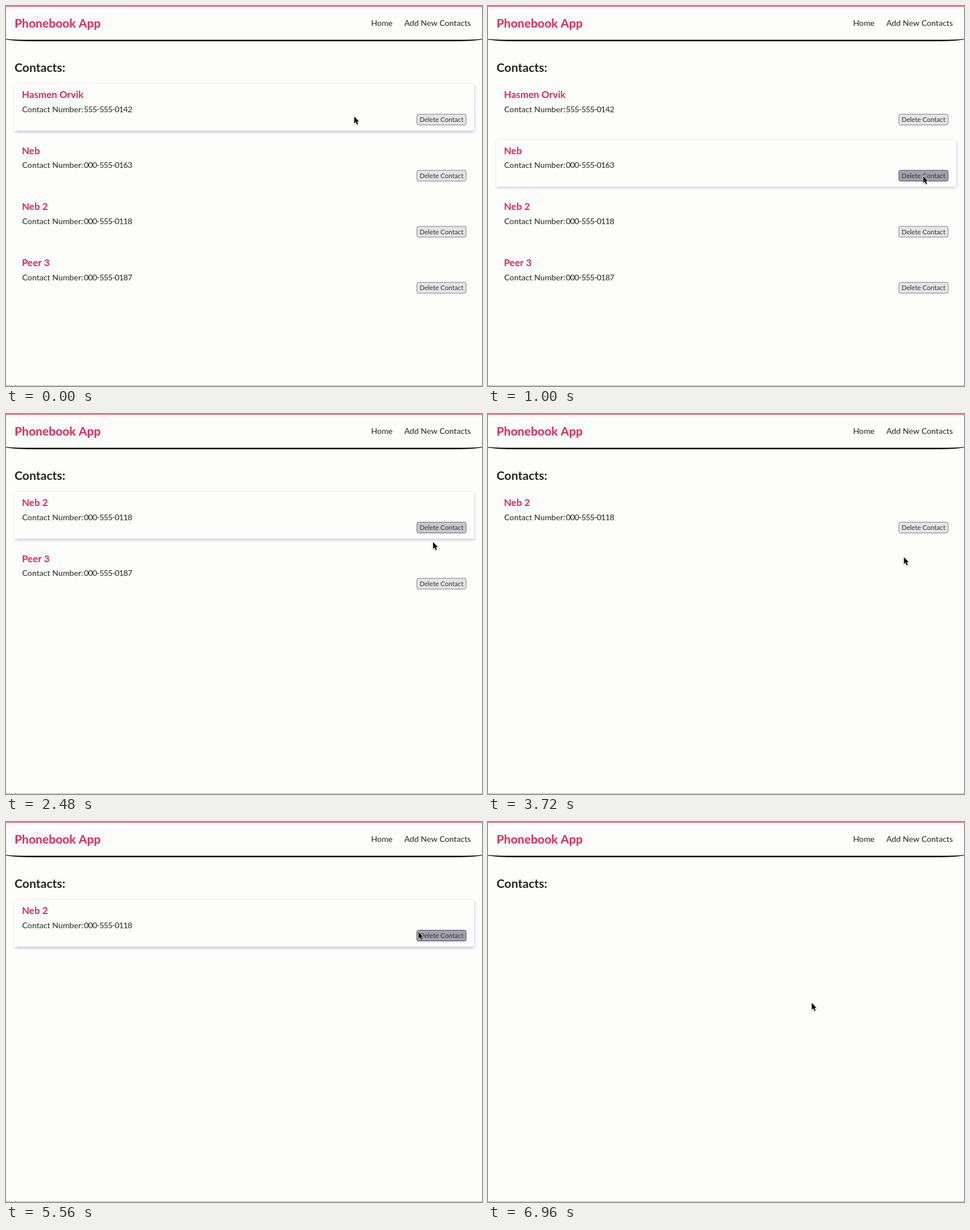
Recreate the animation shown at these times as an HTML page with a canvas. Size 837 by 669 pixels, loop 7000 ms.

```html
<!DOCTYPE html>
<html lang="en">
<head>
<meta charset="utf-8">
<title>Phonebook App</title>
<style>
  html, body { margin: 0; width: 100%; height: 100%; overflow: hidden; background: #fdfdfb; }
  canvas { display: block; width: 837px; height: 669px; }
</style>
</head>
<body>
<canvas id="stage" width="837" height="669"></canvas>
<script>
const ctx = document.getElementById('stage').getContext('2d');
const W = 837, H = 669, LOOP = 7000;
const BG = '#fdfdfb', PINK = '#e0295d', INK = '#242424';
const ROW_TOP = 137, ROW_STEP = 98.7;
const CARD = { x: 14.5, w: 808.5, h: 82.5 };
const BUTTON = { x: 722.5, y: 53.5, w: 86.5, h: 19 };
const PRESS = 200;

const contacts = [
  { name: 'Hasmen Orvik', phone: '555-555-0142', gone: 2120 },
  { name: 'Neb', phone: '000-555-0163', gone: 1240 },
  { name: 'Neb 2', phone: '000-555-0118', gone: 6040 },
  { name: 'Peer 3', phone: '000-555-0187', gone: 3400 }
];

// Pointer path: time, x, y
const path = [
  [0, 612, 194], [240, 632, 222], [400, 680, 266], [560, 722, 292],
  [640, 734, 297], [800, 765, 299], [1300, 765, 299], [1520, 752, 270],
  [1760, 765, 200], [2350, 765, 200], [2560, 742, 240], [2740, 748, 268],
  [2920, 757, 281], [3060, 765, 299], [3480, 765, 299], [3800, 720, 236],
  [4120, 574, 142], [4200, 545, 83], [4360, 510, 72], [4700, 560, 110],
  [5000, 640, 160], [5380, 723, 191], [5560, 725, 193], [5760, 738, 199],
  [6080, 738, 199], [6400, 680, 260], [6700, 600, 310], [6960, 569, 318],
  [LOOP, 569, 318]
];

function pointer(t) {
  const i = Math.max(1, path.findIndex(p => p[0] >= t));
  const a = path[i - 1], b = path[i];
  const k = (t - a[0]) / (b[0] - a[0]);
  return { x: a[1] + (b[1] - a[1]) * k, y: a[2] + (b[2] - a[2]) * k };
}

function rowTop(c, t) {
  const above = contacts.slice(0, contacts.indexOf(c)).filter(o => t < o.gone);
  return ROW_TOP + above.length * ROW_STEP;
}

const inside = (p, x, y, w, h) => p.x >= x && p.x <= x + w && p.y >= y && p.y <= y + h;
const onCard = (c, t) => inside(pointer(t), CARD.x, rowTop(c, t), CARD.w, CARD.h);
const onButton = (c, t) =>
  inside(pointer(t), BUTTON.x, rowTop(c, t) + BUTTON.y, BUTTON.w, BUTTON.h);

// Share of the last few moments spent hovering: a linear hover transition
function hoverLevel(test, c, t, span) {
  const n = 16;
  let sum = 0;
  for (let i = 0; i < n; i++) sum += test(c, Math.max(0, t - span * i / n));
  return sum / n;
}

const mix = (a, b, k) => `rgb(${a.map((v, i) => Math.round(v + (b[i] - v) * k)).join()})`;

function text(str, x, y, size, { weight = 400, color = INK, align = 'left', track = 0 } = {}) {
  ctx.font = `${weight} ${size}px Lato, sans-serif`;
  ctx.letterSpacing = track + 'px';
  ctx.textAlign = align;
  ctx.fillStyle = color;
  ctx.fillText(str, x, y);
}

function drawHeader() {
  ctx.fillStyle = PINK;
  ctx.fillRect(0, 0, W, 1);
  ctx.fillStyle = '#000';
  ctx.beginPath();
  ctx.moveTo(0, 58);
  ctx.quadraticCurveTo(16, 59.5, 44, 59.5);
  ctx.lineTo(W - 44, 59.5);
  ctx.quadraticCurveTo(W - 16, 59.5, W, 58);
  ctx.lineTo(W, 59);
  ctx.quadraticCurveTo(W - 16, 61.9, W - 44, 61.9);
  ctx.lineTo(44, 61.9);
  ctx.quadraticCurveTo(16, 61.9, 0, 59);
  ctx.fill();
  text('Phonebook App', 15, 37.5, 21.1, { weight: 700, color: PINK });
  text('Home', 642, 35, 14.2);
  text('Add New Contacts', 817.5, 35, 14.2, { align: 'right' });
  text('Contacts:', 15, 115.5, 21.2, { weight: 700 });
}

function drawCard(y, level) {
  if (!level) return;
  ctx.save();
  ctx.shadowColor = `rgba(85, 85, 150, ${0.36 * level})`;
  ctx.shadowBlur = 5;
  ctx.shadowOffsetX = 1;
  ctx.shadowOffsetY = 2;
  ctx.fillStyle = BG;
  ctx.fillRect(CARD.x, y, CARD.w, CARD.h);
  ctx.restore();
}

function drawButton(y, level) {
  ctx.beginPath();
  ctx.roundRect(BUTTON.x, y, BUTTON.w, BUTTON.h, 3);
  ctx.fillStyle = mix([228, 228, 229], [163, 162, 172], level);
  ctx.fill();
  ctx.lineWidth = 1;
  ctx.strokeStyle = mix([128, 128, 134], [72, 70, 100], level);
  ctx.stroke();
  text('Delete Contact', BUTTON.x + BUTTON.w / 2, y + 13.7, 11.6,
    { color: '#303030', align: 'center' });
}

function drawContact(c, t) {
  const y = rowTop(c, t);
  drawCard(y, hoverLevel(onCard, c, t, 320));
  text(c.name, 28, y + 25, 17, { weight: 700, color: PINK });
  text('Contact Number:', 28.5, y + 49.5, 14.2);
  text(c.phone, 137, y + 49.5, 14.2, { track: -0.7 });
  drawButton(y + BUTTON.y, hoverLevel(onButton, c, t, 160));
}

function drawRing({ x, y }) {
  ctx.beginPath();
  ctx.arc(x, y, 16.5, 0, Math.PI * 2);
  ctx.fillStyle = 'rgba(255, 255, 255, 0.28)';
  ctx.fill();
  ctx.lineWidth = 4;
  ctx.strokeStyle = 'rgba(255, 255, 255, 0.6)';
  ctx.stroke();
  ctx.lineWidth = 2.4;
  ctx.strokeStyle = '#080808';
  ctx.stroke();
}

function drawPointer({ x, y }) {
  ctx.save();
  ctx.translate(x, y);
  ctx.beginPath();
  ctx.moveTo(0.3, 0.5);
  ctx.lineTo(0.3, 12.6);
  ctx.lineTo(3, 10);
  ctx.lineTo(5, 14.6);
  ctx.lineTo(7, 13.7);
  ctx.lineTo(5, 9.2);
  ctx.lineTo(8.6, 9.2);
  ctx.closePath();
  ctx.lineWidth = 1.6;
  ctx.lineJoin = 'round';
  ctx.strokeStyle = '#fff';
  ctx.shadowColor = 'rgba(0, 0, 0, 0.3)';
  ctx.shadowBlur = 2;
  ctx.shadowOffsetY = 1;
  ctx.stroke();
  ctx.shadowColor = 'transparent';
  ctx.fillStyle = '#000';
  ctx.fill();
  ctx.restore();
}

function draw(t) {
  ctx.fillStyle = BG;
  ctx.fillRect(0, 0, W, H);
  drawHeader();
  contacts.filter(c => t < c.gone).forEach(c => drawContact(c, t));
  ctx.fillStyle = '#b3b3a8';
  ctx.fillRect(0, H - 1, W, 1);
  const p = pointer(t);
  if (contacts.some(c => t >= c.gone - PRESS && t < c.gone)) drawRing(p);
  drawPointer(p);
}

const start = performance.now();
function tick() {
  draw((performance.now() - start) % LOOP);
  requestAnimationFrame(tick);
}
tick();
</script>
</body>
</html>
```
